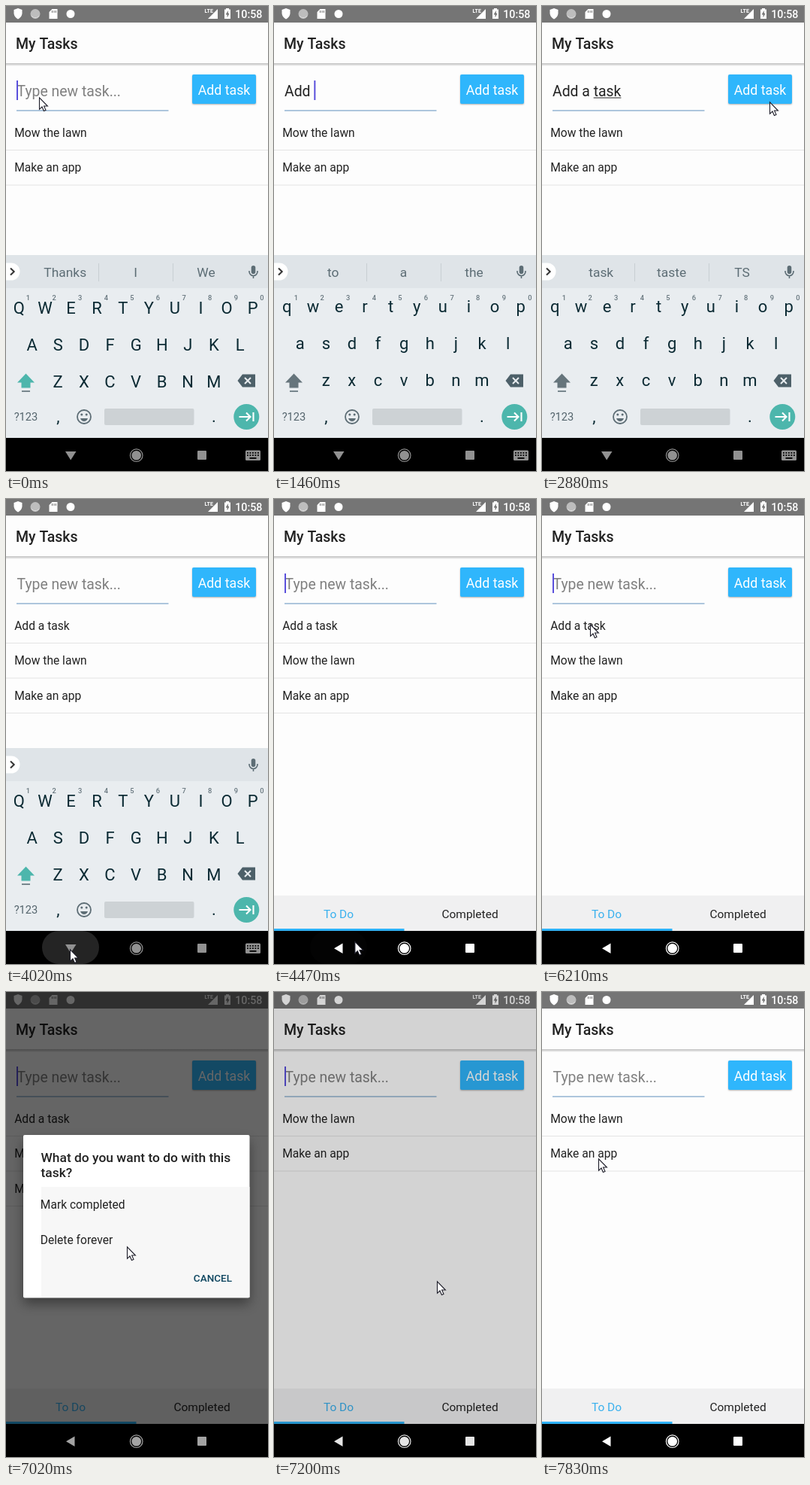
These frames come from a looping animation (349x618 px, 8 s). An HTML page with a canvas:

```html
<!DOCTYPE html>
<html lang="en">
<head>
<meta charset="utf-8">
<title>My Tasks</title>
<style>
  html, body { margin: 0; width: 100%; height: 100%; overflow: hidden; background: #fff; }
  canvas { display: block; width: 349px; height: 618px; }
</style>
</head>
<body>
<canvas id="stage"></canvas>
<script>
const W = 349, H = 618, LOOP = 8000;
const canvas = document.getElementById('stage');
const ctx = canvas.getContext('2d');
const ratio = window.devicePixelRatio || 1;
canvas.width = W * ratio;
canvas.height = H * ratio;

const BLUE = '#2fb6fc', TEAL = '#4db6ac', GREY = '#5d6d75', INK = '#222', KEY = '#0b2a33', KEYBED = '#e9edf0';

// Moments of the story, in ms
const POINTER_HIDE = 370, TYPE_START = 830, POINTER_SHOW = 2610, ADDED = 3050,
      BACK_PRESS = 3950, KEYBOARD_DOWN = 4060, KEYBOARD_GONE = 4190,
      DIALOG_OPEN = 6240, DIALOG_CLOSE = 7060, DELETED = 7120;

// [time, text, suggestions]
const typing = [
  [0, '', ['Thanks', 'I', 'We']],
  [TYPE_START, 'A', ['And', 'A', 'At']],
  [1100, 'Ad', ['Ad', 'Add', 'And']],
  [1280, 'Add', ['Add', 'Added', 'Adds']],
  [1460, 'Add ', ['to', 'a', 'the']],
  [1610, 'Add a', ['a', 'an', 'A']],
  [1700, 'Add a ', ['new', 'few', 'little']],
  [1880, 'Add a t', ['the', 'to', 'this']],
  [1970, 'Add a ta', ['ta', 'take', 'TA']],
  [2060, 'Add a tas', ['task', 'taste', 'TAs']],
  [2150, 'Add a task', ['task', 'taste', 'TS']],
  [ADDED, '', []]
];

// [time, x, y] of the pointer tip
const pointerPath = [
  [0, 44, 121], [POINTER_SHOW, 60, 122], [2850, 303, 127], [3080, 303, 127],
  [3330, 140, 555], [3600, 85, 598], [4230, 85, 598], [4650, 124, 580],
  [5070, 93, 509], [5500, 66, 184], [5850, 64, 166], [6400, 64, 166],
  [6930, 161, 338], [7080, 161, 338], [7190, 217, 384], [7300, 217, 384],
  [7560, 90, 274], [7790, 75, 221], [LOOP, 75, 221]
];

const progress = (t, from, to) => Math.min(1, Math.max(0, (t - from) / (to - from)));
const within = (t, from, to) => t >= from && t < to;

function rect(x, y, w, h, fill, radius = 0) {
  ctx.fillStyle = fill;
  ctx.beginPath();
  ctx.roundRect(x, y, w, h, radius);
  ctx.fill();
}

function circle(x, y, r, fill) {
  ctx.fillStyle = fill;
  ctx.beginPath();
  ctx.arc(x, y, r, 0, 7);
  ctx.fill();
}

function text(string, x, y, size, fill, align = 'left', weight = 400) {
  ctx.font = `${weight} ${size}px Roboto, sans-serif`;
  ctx.textAlign = align;
  ctx.fillStyle = fill;
  ctx.fillText(string, x, y);
}

const fillPath = (d, fill) => { ctx.fillStyle = fill; ctx.fill(new Path2D(d)); };
function strokePath(d, color, width = 1) {
  ctx.strokeStyle = color;
  ctx.lineWidth = width;
  ctx.stroke(new Path2D(d));
}

function withShadow(color, blur, dy, draw) {
  ctx.save();
  ctx.shadowColor = color;
  ctx.shadowBlur = blur * ratio;
  ctx.shadowOffsetY = dy * ratio;
  draw();
  ctx.restore();
}

function drawStatusBar() {
  rect(0, 0, W, 22, '#757575');
  fillPath('M16 3 L21.5 5 V10 Q21 15 16 17.5 Q11 15 10.5 10 V5 Z', '#fff');
  circle(39, 10.5, 6.5, '#bdbdbd');
  strokePath('M34 13 A6 6 0 0 0 44 13', '#ddd');
  fillPath('M61.5 4 H68.5 V17 H57.5 V8 Z', '#fff');
  strokePath('M61.5 6 V9 M64 6 V9 M66.3 6 V9', '#757575');
  circle(86, 10.5, 5.5, '#fff');
  text('LTE', 264.5, 9, 7, '#fff', 'left', 700);
  fillPath('M282 4 V17 H269 Z', '#fff');
  fillPath('M293 3 H297 V4.5 H299 V17 H291 V4.5 H293 Z', '#fff');
  fillPath('M295.8 6 L292.6 11.6 H294.6 V15.5 L297.6 9.8 H295.8 Z', '#757575');
  text('10:58', 341.5, 15.5, 14.3, '#fff', 'right', 500);
}

function drawHeader() {
  const shade = ctx.createLinearGradient(0, 75.5, 0, 80);
  shade.addColorStop(0, '#bcbcbc');
  shade.addColorStop(0.5, '#d6d6d6');
  shade.addColorStop(1, '#fdfdfd');
  rect(0, 75.5, W, 4.5, shade);
  rect(0, 22, W, 54, '#fdfdfd');
  text('My Tasks', 13, 57, 19.5, INK, 'left', 500);
}

function caretVisible(t) {
  if (t < ADDED) return t < POINTER_HIDE || within(t, TYPE_START, 2645);
  return (t - 3040) % 990 < 495;
}

function drawInput(t, value) {
  const size = 19.4;
  rect(14, 138.5, 202.5, 1, '#5f8fbd');
  if (value) {
    text(value, 14, 120, size, INK);
    const wordStart = value.lastIndexOf(' ') + 1;
    const left = ctx.measureText(value.slice(0, wordStart)).width;
    rect(14 + left, 121.5, ctx.measureText(value).width - left, 1, INK);
  } else {
    text('Type new task...', 14.5, 120, size, '#808080');
  }
  if (caretVisible(t)) rect(14 + (value ? ctx.measureText(value).width : 0), 99, 2, 26, '#5a50dc');
}

function drawButton() {
  withShadow('rgba(0,0,0,.3)', 2, 1, () => rect(248, 91, 85, 39, BLUE, 2));
  text('Add task', 290.5, 117.5, 17.8, '#fff', 'center');
}

function drawTasks(t) {
  const tasks = ['Mow the lawn', 'Make an app'];
  if (within(t, ADDED, DELETED)) tasks.unshift('Add a task');
  tasks.forEach((task, i) => {
    text(task, 11.2, 173.7 + i * 46.5, 15.6, INK);
    rect(0, 191 + i * 46.5, W, 1, '#e4e4e4');
  });
}

function drawTabs() {
  rect(0, 527, W, 47, '#f0f0f1');
  rect(0, 571, 173.5, 3, '#2eb2f6');
  text('To Do', 86, 556.5, 15.5, '#38b0ee', 'center');
  text('Completed', 261, 556.5, 15.5, INK, 'center');
}

function drawSuggestions(words) {
  rect(0, 331, W, 44, '#dfe4e8');
  words.forEach((word, i) => text(word, 78.7 + i * 93.9, 360, 17.4, GREY, 'center'));
  if (words.length) {
    rect(123, 342, 1, 24, '#c8cfd3');
    rect(222, 342, 1, 24, '#c8cfd3');
  }
  rect(-12, 341.5, 30.5, 23, '#fff', 11.5);
  strokePath('M6 348.5 L10.7 353 L6 357.5', '#333', 2);
  rect(326.7, 345, 5.6, 11, GREY, 2.8);
  strokePath('M324 352 V353 A5.5 5.5 0 0 0 335 353 V352 M329.5 358 V362', GREY, 1.6);
}

function drawKeys(upper) {
  rect(0, 375, W, 199, KEYBED);
  const rows = [['qwertyuiop', 17.3, 409], ['asdfghjkl', 34.8, 458], ['zxcvbnm', 69.2, 507]];
  for (const [letters, left, baseline] of rows) {
    [...letters].forEach((letter, i) => {
      const y = upper ? baseline : baseline - 2;
      text(upper ? letter.toUpperCase() : letter, left + i * 34.6, y, 22, KEY, 'center');
    });
  }
  for (let i = 0; i < 10; i++) text((i + 1) % 10, 29.5 + i * 34.6, 391, 9.3, '#66757d', 'center', 500);

  fillPath('M26.5 488.5 L38 500.5 H32.5 V507.5 H20.5 V500.5 H15 Z', upper ? TEAL : '#66757c');
  rect(21, 511, 11, 2, '#78878e');
  fillPath('M308.5 498 L315 489.5 H332 V506.5 H315 Z', '#4d6069');
  strokePath('M318 494 L326 502 M326 494 L318 502', KEYBED, 2);

  text('?123', 26.5, 551, 14.7, '#55656d', 'center');
  text(',', 69.5, 553, 22, KEY, 'center');
  text('.', 277, 553, 22, KEY, 'center');
  strokePath('M113 546 A9 9 0 1 1 95 546 A9 9 0 1 1 113 546', GREY, 1.8);
  circle(100.8, 543, 1.5, GREY);
  circle(107.2, 543, 1.5, GREY);
  fillPath('M99 548 H109 Q107.5 552 104 552 Q100.5 552 99 548 Z', GREY);
  rect(131, 535, 119.5, 22, '#cdd2d5', 2);
  circle(320.3, 546, 17, TEAL);
  strokePath('M310.5 546 H325 M320 540.5 L325.5 546 L320 551.5 M329.5 540 V552', '#fff', 2.1);
}

function drawKeyboard(t, suggestions) {
  if (t >= KEYBOARD_GONE) return;
  ctx.save();
  ctx.beginPath();
  ctx.rect(0, 0, W, 574);
  ctx.clip();
  ctx.translate(0, 243 * progress(t, KEYBOARD_DOWN, KEYBOARD_GONE) ** 2);
  drawSuggestions(suggestions);
  drawKeys(!within(t, TYPE_START, ADDED));
  ctx.restore();
}

function drawNavBar(t, dim) {
  const keyboardOpen = t < KEYBOARD_DOWN;
  const level = keyboardOpen ? 145 : Math.round(255 * (1 - dim * 0.6));
  const color = `rgb(${level},${level},${level})`;
  rect(0, 574, W, 44, '#000');

  const ripple = progress(t, BACK_PRESS, BACK_PRESS + 50) * (1 - progress(t, 4200, 4500));
  if (ripple) rect(48, 574, 76, 44, `rgba(255,255,255,${0.14 * ripple})`, 22);

  fillPath(keyboardOpen ? 'M79 592 H93.5 L86.2 603.5 Z' : 'M91.5 590.5 V604 L80 597.2 Z', color);
  circle(173.7, 597.2, 6.3, color);
  strokePath('M182 597.2 A8.3 8.3 0 1 1 165.4 597.2 A8.3 8.3 0 1 1 182 597.2', color, 1.2);
  rect(255, 591, 12, 12, color, 1);
  if (keyboardOpen) {
    rect(319, 590.5, 20, 13.5, color, 1.5);
    for (let i = 0; i < 10; i++) rect(321 + (i % 5) * 3.5, 593 + (i > 4) * 3.3, 1.8, 1.8, '#000');
    rect(324.5, 600, 9, 1.8, '#000');
  }
}

function drawDialog(opacity) {
  ctx.save();
  ctx.globalAlpha = opacity;
  withShadow('rgba(0,0,0,.4)', 16, 8, () => rect(23, 190, 301.5, 216.5, '#fff', 2));
  rect(47, 259, 277.5, 147, '#f7f7f7');
  text('What do you want to do with this', 46.5, 226, 17.4, INK, 'left', 500);
  text('task?', 46.5, 246, 17.4, INK, 'left', 500);
  text('Mark completed', 45.8, 288, 15.6, INK);
  text('Delete forever', 45.8, 334.7, 15.6, INK);
  text('CANCEL', 301, 384.7, 13.5, '#0d4660', 'right', 500);
  ctx.restore();
}

function drawPointer(t) {
  if (within(t, POINTER_HIDE, POINTER_SHOW)) return;
  const next = pointerPath.findIndex(point => point[0] > t);
  const [t0, x0, y0] = pointerPath[next - 1];
  const [t1, x1, y1] = pointerPath[next];
  const p = t < POINTER_HIDE ? 0 : progress(t, t0, t1);
  ctx.save();
  ctx.translate(x0 + (x1 - x0) * p, y0 + (y1 - y0) * p);
  const arrow = 'M.5 .8 V16.3 L4 13 L6.4 18.5 L9 17.4 L6.6 12 H11.4 Z';
  fillPath(arrow, '#fff');
  strokePath(arrow, '#1c1c28', 1.1);
  ctx.restore();
}

function draw(t) {
  ctx.setTransform(ratio, 0, 0, ratio, 0, 0);
  const [, value, suggestions] = typing.findLast(step => step[0] <= t);
  const dim = 0.6 * progress(t, DIALOG_OPEN, DIALOG_OPEN + 160) * (1 - progress(t, 7090, 7245));
  const dialog = progress(t, DIALOG_OPEN, DIALOG_OPEN + 140) * (1 - progress(t, DIALOG_CLOSE, DIALOG_CLOSE + 100));

  rect(0, 0, W, H, '#fdfdfd');
  drawStatusBar();
  drawHeader();
  drawInput(t, value);
  drawButton();
  drawTasks(t);
  if (t >= KEYBOARD_DOWN) drawTabs();
  drawKeyboard(t, suggestions);
  if (dim) rect(0, 0, W, 574, `rgba(0,0,0,${dim})`);
  drawNavBar(t, dim);
  if (dialog) drawDialog(dialog);
  drawPointer(t);
}

function tick() {
  draw(performance.now() % LOOP);
  requestAnimationFrame(tick);
}
tick();
</script>
</body>
</html>
```
